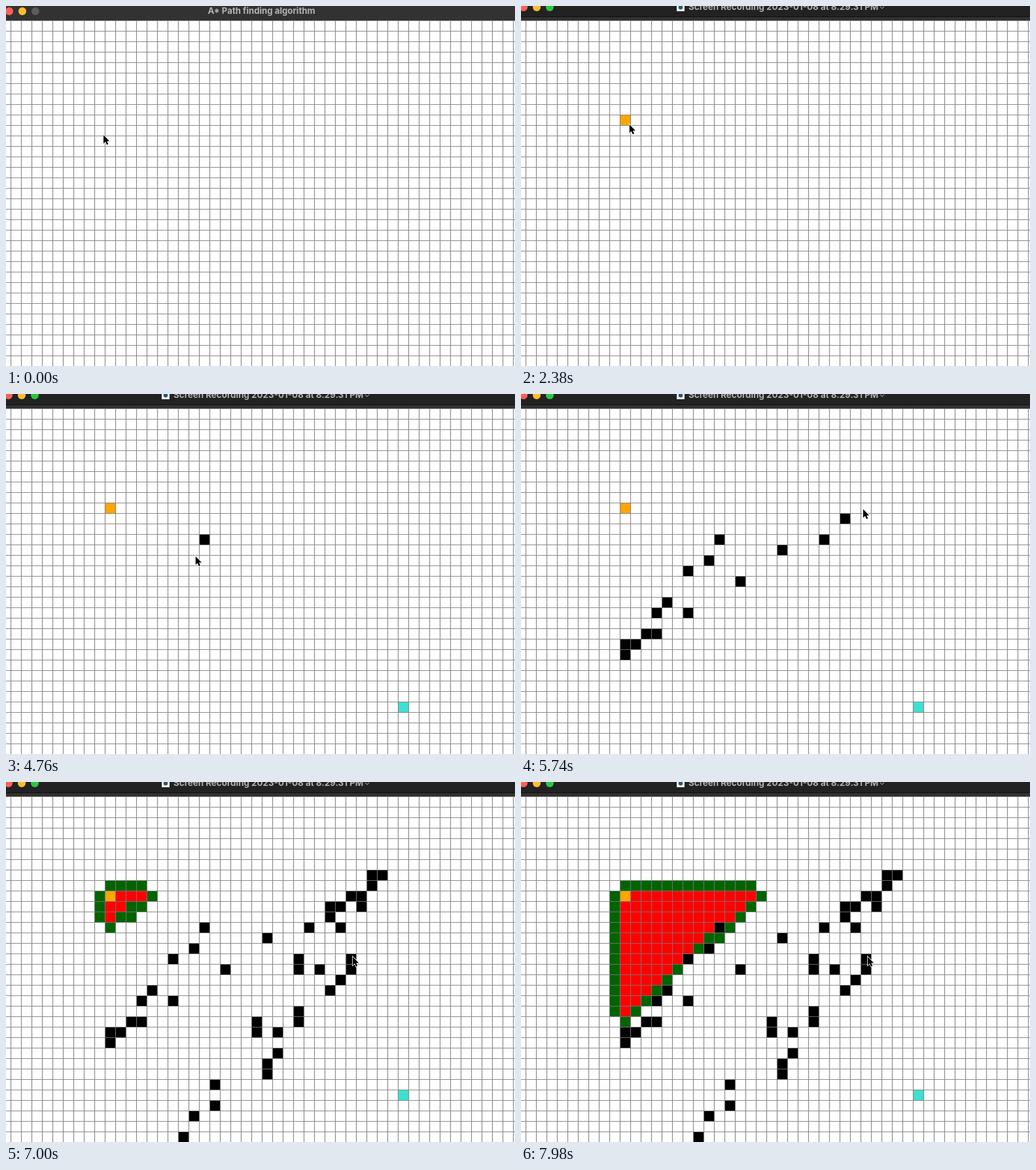
An HTML page that plays this animation: 778 by 550 pixels, repeating every 8000 ms.

```html
<!DOCTYPE html>
<html lang="en">
<head>
<meta charset="utf-8">
<title>Path finding</title>
<style>
  html, body { margin: 0; width: 100%; height: 100%; overflow: hidden; background: #fff; }
  svg { display: block; width: 100vw; height: 100vh; }
  text { font-family: Inter, "Liberation Sans", sans-serif; font-weight: 700; }
</style>
</head>
<body>
<svg viewBox="0 0 778 550">
  <rect width="778" height="550" fill="#fff"/>
  <path id="open" fill="#006400"/>
  <path id="closed" fill="#f00"/>
  <path id="walls"/>
  <path id="start" fill="#ffa500"/>
  <path id="goal" fill="#40e0d0"/>
  <path id="grid" fill="none" stroke="#777" stroke-opacity=".85" stroke-width="1.2"/>
  <rect width="778" height="22" fill="#323232"/>
  <circle cx="5" cy="8" r="6" fill="#ff5f57"/>
  <circle cx="25" cy="8" r="6" fill="#febc2e"/>
  <circle cx="45" cy="8" r="6" fill="#5c5c5c"/>
  <text x="390.5" y="12" font-size="13.2" text-anchor="middle" fill="#b5b5b5">A* Path finding algorithm</text>
  <g id="bar">
    <rect width="778" height="16" fill="#222"/>
    <rect y="16" width="778" height="1" fill="#111"/>
    <circle class="light" cx="4" cy="2" r="6"/>
    <circle class="light" cx="24" cy="2" r="6"/>
    <circle class="light" cx="44" cy="2" r="6"/>
    <g id="label">
      <rect x="238" y="-4" width="12" height="12" fill="#f2f4f5"/>
      <circle cx="244" cy="2" r="3.2" fill="#2c5570"/>
      <text x="256" y="6" font-size="13.4" fill="#b0b0b0">Screen Recording 2023-01-08 at 8.29.31 PM</text>
      <path d="M549 .8l3 3 3-3" fill="none" stroke="#909090" stroke-width="1.2"/>
    </g>
  </g>
  <path id="cursor" d="M0 0V13L3 10.3 5 15 7.3 14 5.3 9.5H9.2Z" stroke="#fff" stroke-width="1.6" paint-order="stroke"/>
</svg>
<script>
const LOOP = 8000, STEP = 70, CELL = 16, LEFT = 7.5, TOP = 22.5;
const START = [9, 9], GOAL = [37, 28];
const $ = id => document.getElementById(id);
const lights = [...document.querySelectorAll('.light')];

const clamp = v => Math.min(1, Math.max(0, v));
const smooth = v => v * v * (3 - 2 * v);
const center = ([c, r]) => [LEFT + CELL * (c + .5), TOP + CELL * (r + .5) - 2];
const squares = cells =>
  cells.map(([c, r]) => `M${LEFT + CELL * c} ${TOP + CELL * r}h16v16h-16z`).join('');

// Mouse strokes that paint walls: begin, end, cells in order
const strokes = [
  [4690, 5180, '18,12 17,14 15,15 13,18 12,19 9,22 9,23'],
  [5250, 5670, '10,22 11,21 12,21 15,19 20,16 24,13 28,12 30,10'],
  [5810, 5950, '32,9 31,10 30,11 27,15 23,21 19,27 17,30 16,32'],
  [6090, 6290, '19,29 23,22 27,16 27,15 31,12 33,10 33,9 34,7 35,7'],
  [6310, 6480, '34,8 29,16 23,21 25,22 25,24 24,26'],
  [6510, 6710, '24,25 27,21 27,20 30,18 31,17 32,16 32,15']
];
const walls = strokes.flatMap(([from, to, text]) => {
  const cells = text.split(' ').map(s => s.split(',').map(Number));
  return cells.map((cell, i) => ({ cell, at: from + (to - from) * i / (cells.length - 1) }));
});
const wallKeys = new Set(walls.map(w => w.cell.join()));

// Cursor stops: time, x, y
const stops = [
  [0, 149, 197], [1750, 149, 197], [2030, 157, 175], [2310, 157, 175],
  [3150, 601, 475], [3500, 601, 475], [3990, 609, 479], [4100, 609, 479],
  ...walls.map(w => [w.at, ...center(w.cell)]),
  [5740, 523, 176], [6720, 530, 267], [LOOP, 530, 267]
].sort((a, b) => a[0] - b[0]);

function cursorAt(t) {
  const i = Math.max(1, stops.findIndex(s => s[0] >= t));
  const [a, b] = [stops[i - 1], stops[i]];
  const k = clamp((t - a[0]) / (b[0] - a[0] || 1));
  const e = a[0] < 4600 ? smooth(k) : k;
  return [a[1] + (b[1] - a[1]) * e, a[2] + (b[2] - a[2]) * e];
}

// Equal-cost cells are visited first in, first out; the current one still counts as open
function search(count) {
  const queue = [START], seen = new Set([START.join()]), closed = [], open = [];
  for (let n = 0; n < count && n < queue.length; n++) {
    const [c, r] = queue[n];
    for (const [dc, dr] of [[1, 0], [-1, 0], [0, 1], [0, -1]]) {
      const next = [c + dc, r + dr], key = next.join();
      if (seen.has(key) || wallKeys.has(key)) continue;
      seen.add(key);
      open.push(next);
      if (next[0] >= START[0] && next[1] >= START[1]) queue.push(next);
    }
    if (n && n < count - 1) closed.push([c, r]);
  }
  return { open, closed };
}

function visits(t) {
  if (t < 6930) return 0;
  return Math.round(t < 7560 ? 8 + (t - 7000) * 41 / 560 : 49 + (t - 7560) * 33 / 420);
}

function draw(t) {
  const { open, closed } = search(visits(t));
  $('open').setAttribute('d', squares(open));
  $('closed').setAttribute('d', squares(closed));
  $('walls').setAttribute('d', squares(walls.filter(w => w.at <= t).map(w => w.cell)));
  $('start').setAttribute('d', t >= 2380 ? squares([START]) : '');
  $('goal').setAttribute('d', t >= 3780 ? squares([GOAL]) : '');
  $('cursor').setAttribute('transform', `translate(${cursorAt(t)})`);

  const active = t >= 1470;
  $('bar').setAttribute('opacity', clamp((t - 490) / 490));
  $('label').setAttribute('opacity', active ? 1 : .52);
  lights.forEach((light, i) =>
    light.setAttribute('fill', active ? ['#ff5f57', '#febc2e', '#28c840'][i] : '#4b524e'));
}

let grid = '';
for (let x = LEFT; x < 778; x += CELL) grid += `M${x} 22V550`;
for (let y = TOP; y < 550; y += CELL) grid += `M0 ${y}H778`;
$('grid').setAttribute('d', grid);

let last = -1;
function tick() {
  const t = Math.floor(performance.now() % LOOP / STEP) * STEP;
  if (t !== last) draw(last = t);
  requestAnimationFrame(tick);
}
tick();
</script>
</body>
</html>
```
